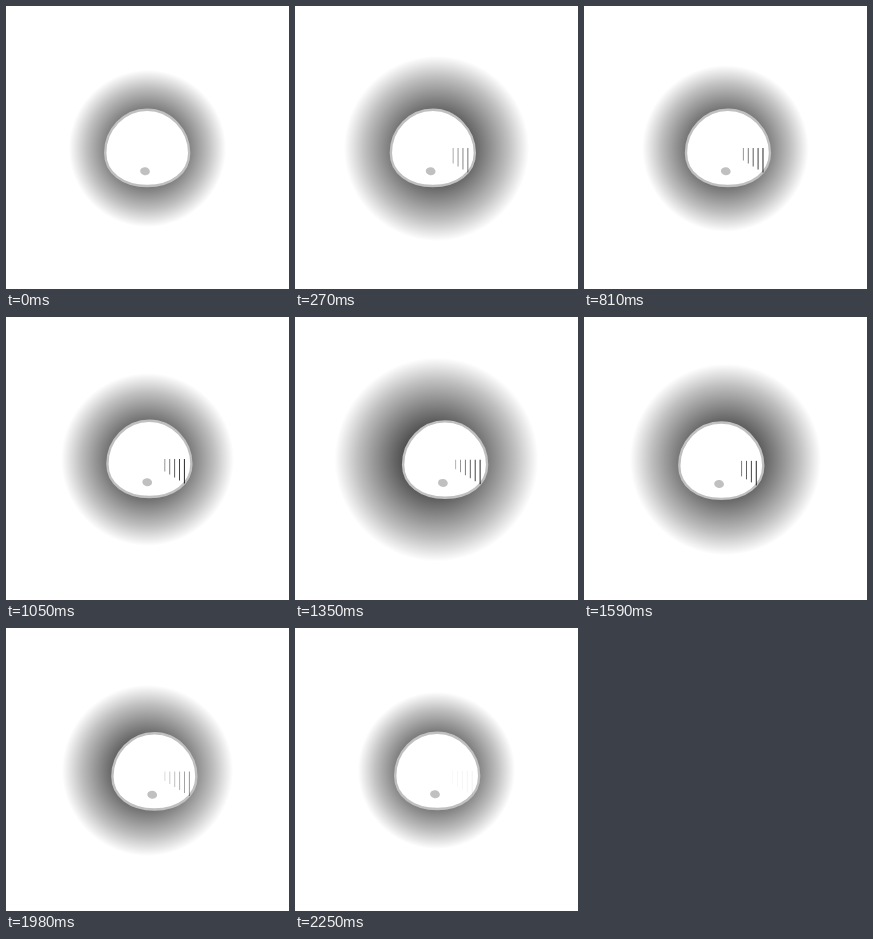
An HTML page with a canvas for the animation above (2.31 s loop, 283 by 283 pixels).

```html
<!DOCTYPE html>
<html>
<head>
<meta charset="utf-8">
<style>
  html, body { margin: 0; width: 100%; height: 100%; overflow: hidden; background: #fff; }
  canvas { display: block; }
</style>
</head>
<body>
<canvas id="stage" width="283" height="283"></canvas>
<script>
const SIZE = 283;
const LOOP = 2310;
const STEP = 30;
const GREY = '#c0c0c0';
const ctx = document.getElementById('stage').getContext('2d');

const lerp = (a, b, p) => a + (b - a) * p;
const ramp = (t, from, to) => Math.min(1, Math.max(0, (t - from) / (to - from)));

// Triangle wave from 0 up to 1 and back.
function triangle(t, period) {
  const phase = ((t / period) % 1 + 1) % 1;
  return 1 - Math.abs(2 * phase - 1);
}

// Leaves rest to the left, swings between both sides, then settles.
function swayAt(t) {
  const left = 134.5, right = 153.5;
  const period = 465, swingStart = 229, swingEnd = swingStart + 3.5 * period;
  if (t < swingStart) return lerp(141.2, left, t / swingStart);
  if (t > swingEnd) return lerp(right, 142.2, ramp(t, swingEnd, 2130));
  return lerp(left, right, triangle(t - swingStart, period));
}

const dropAt = t => 2 * ramp(t, 1200, 1620) - ramp(t, 1860, 2130);

// Two pulses; the second one fades at half speed.
function glowAt(t) {
  const pulse = t < 1350 ? triangle(t, 900) : 1 - ramp(t, 1350, 2250);
  return 81 + 24 * pulse;
}

const barsAt = t => ramp(t, 0, 420) * (1 - ramp(t, 1650, 2290));

function drawGlow(radius) {
  const glow = ctx.createRadialGradient(141.5, 142.5, 0, 141.5, 142.5, radius);
  glow.addColorStop(0, '#000');
  glow.addColorStop(0.75, '#bfbfbf');
  glow.addColorStop(0.97, '#fff');
  ctx.fillStyle = glow;
  ctx.fillRect(0, 0, SIZE, SIZE);
}

function drawBody() {
  ctx.beginPath();
  ctx.moveTo(-42, 147);
  ctx.bezierCurveTo(-42, 123, -23, 103.7, 0, 103.7);
  ctx.bezierCurveTo(23, 103.7, 42, 124, 42, 147);
  ctx.bezierCurveTo(42, 167, 24, 180, 0, 180);
  ctx.bezierCurveTo(-24, 180, -42, 167, -42, 147);
  ctx.closePath();
  ctx.fillStyle = '#fff';
  ctx.fill();
  ctx.strokeStyle = GREY;
  ctx.lineWidth = 2.4;
  ctx.stroke();
}

function drawMouth() {
  ctx.beginPath();
  ctx.ellipse(-2.2, 165.2, 4.9, 4, 0.15, 0, 2 * Math.PI);
  ctx.fillStyle = GREY;
  ctx.fill();
}

function drawBars(x, opacity) {
  for (let i = 0; i < 6; i++) {
    const offset = 10.5 + 4.9 * i;
    if (x + offset < 156) continue;
    ctx.fillStyle = `rgba(0, 0, 0, ${opacity * (0.3 + 0.11 * i)})`;
    ctx.fillRect(offset - 0.5, 142, 1, 9.5 + 3 * i);
  }
}

function draw(t) {
  const x = swayAt(t);
  drawGlow(glowAt(t));
  ctx.save();
  ctx.translate(x, dropAt(t));
  drawBody();
  drawMouth();
  drawBars(x, barsAt(t));
  ctx.restore();
}

const start = performance.now();
function tick() {
  const t = (performance.now() - start) % LOOP;
  draw(Math.min(Math.floor(t / STEP) * STEP, LOOP - 2 * STEP));
  requestAnimationFrame(tick);
}
tick();
</script>
</body>
</html>
```
